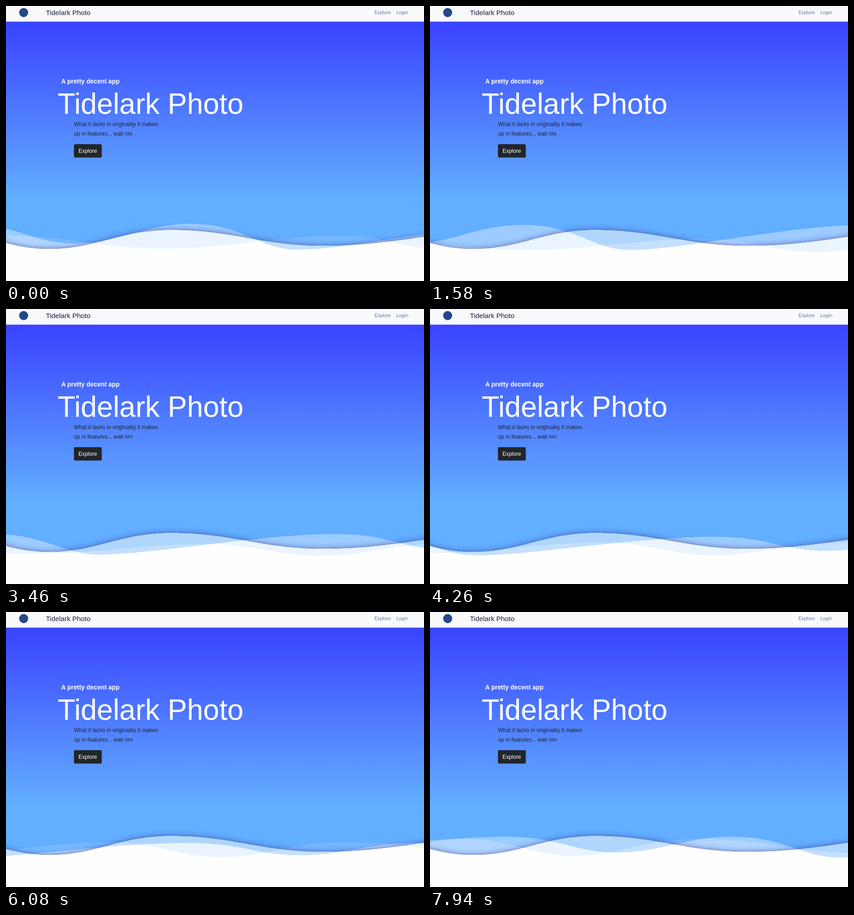
Animation, 923 px wide and 607 px high, one loop 8 s. Source, as an HTML page with a canvas:

```html
<!DOCTYPE html>
<html lang="en">
<head>
<meta charset="utf-8">
<title>Tidelark Photo</title>
<style>
  html, body { margin: 0; width: 100%; height: 100%; overflow: hidden; background: #fefefe; }
  .stage { position: relative; width: 923px; height: 607px; overflow: hidden; }
  .sky { position: absolute; top: 0; width: 923px; height: 558px;
         background: linear-gradient(#3a46ff 46px, #62aeff 424px); }
  canvas, svg { position: absolute; left: 0; top: 0; }
  text { font-family: "Liberation Sans", Arial, sans-serif; }
</style>
</head>
<body>
<div class="stage">
  <div class="sky"></div>
  <canvas id="sea" width="923" height="607"></canvas>
  <svg width="923" height="607" viewBox="0 0 923 607">
    <rect width="923" height="34.5" fill="#f8f9fa"/>
    <circle cx="39" cy="14.5" r="10" fill="#24468c"/>
    <text x="88" y="20" font-size="15.4" fill="#1b1c3a">Tidelark Photo</text>
    <g font-size="10.67" fill="#6478a8">
      <text x="813.5" y="18">Explore</text>
      <text x="862" y="18">Login</text>
    </g>
    <text x="122" y="171" font-size="13.85" font-weight="700" fill="#fff">A pretty decent app</text>
    <text x="114" y="238" font-size="64" fill="#fff">Tidelark Photo</text>
    <g font-size="12.2" fill="#212529">
      <text x="150" y="265">What it lacks in originality it makes</text>
      <text x="150" y="286">up in features... wait nm</text>
    </g>
    <rect x="150" y="305" width="61.5" height="29.5" rx="3" fill="#212529"/>
    <text x="160" y="324" font-size="12.1" fill="#fff">Explore</text>
  </svg>
</div>
<script>
  const WIDTH = 923, HEIGHT = 607, BASE = 558, PERIOD = 1260;
  const LOOP = 8000, STEP = 8000 / 120;

  // Crests and troughs: x, height above the base, handle before, handle after.
  const front = { alpha: 0.5, points: [
    [95, 22, 98, 105], [365, 64, 115, 134], [700, 29, 134, 164], [1110, 64, 164, 98]] };
  const middle = { alpha: 0.37, seconds: 10, lowest: 5.65, points: [
    [152, 36, 95, 100], [408, 82, 105, 115], [642, 21.3, 80, 120], [1165, 82, 170, 120]] };
  const back = { alpha: 0.13, seconds: 15, lowest: 3.15, points: [
    [5, 69, 135, 136], [345, 31, 136, 160], [745, 69, 160, 90], [985, 23.5, 90, 105]] };

  function wavePath(points, shift = 0, scale = 1) {
    const path = new Path2D();
    const y = height => BASE - height * scale;
    let last;
    for (let k = -1; k < 2; k++) {
      for (const [px, height, before, after] of points) {
        const x = px + shift + k * PERIOD;
        if (last) path.bezierCurveTo(last.x + last.after, last.y, x - before, y(height), x, y(height));
        else path.moveTo(x, y(height));
        last = { x, y: y(height), after };
      }
    }
    path.lineTo(last.x, BASE);
    path.lineTo(points[0][0] + shift - PERIOD, BASE);
    path.closePath();
    return path;
  }

  // Height swings linearly between full and 55 % once per period.
  function swell({ seconds, lowest }, t) {
    const phase = (t - lowest) / (seconds / 2) + 1;
    return 0.55 + 0.45 * Math.abs(phase - 2 * Math.floor(phase / 2) - 1);
  }

  const frontPath = wavePath(front.points);

  function makeShadow() {
    const layer = document.createElement('canvas');
    layer.width = WIDTH;
    layer.height = HEIGHT;
    const c = layer.getContext('2d');
    c.shadowColor = 'rgba(50, 30, 145, 0.58)';
    c.shadowBlur = 13;
    c.fill(frontPath);
    c.shadowColor = 'transparent';
    c.globalCompositeOperation = 'destination-out';
    c.fill(frontPath);
    c.fillRect(0, BASE, WIDTH, HEIGHT - BASE);
    return layer;
  }

  const ctx = document.getElementById('sea').getContext('2d');
  const shadow = makeShadow();

  function fillWave(path, alpha) {
    ctx.fillStyle = `rgba(254, 254, 254, ${alpha})`;
    ctx.fill(path);
  }

  function draw(t) {
    ctx.clearRect(0, 0, WIDTH, HEIGHT);
    // Coverage adds up, so all three layers together are solid.
    ctx.globalCompositeOperation = 'lighter';
    for (const wave of [back, middle]) {
      fillWave(wavePath(wave.points, -PERIOD / wave.seconds * t, swell(wave, t)), wave.alpha);
    }
    fillWave(frontPath, front.alpha);
    ctx.globalCompositeOperation = 'source-over';
    ctx.drawImage(shadow, 0, 0);
  }

  const start = performance.now();
  function tick() {
    const ms = (performance.now() - start) % LOOP;
    const step = Math.min(119, Math.floor((ms + 20) / STEP));
    draw(step * STEP / 1000);
    requestAnimationFrame(tick);
  }
  tick();
</script>
</body>
</html>
```
